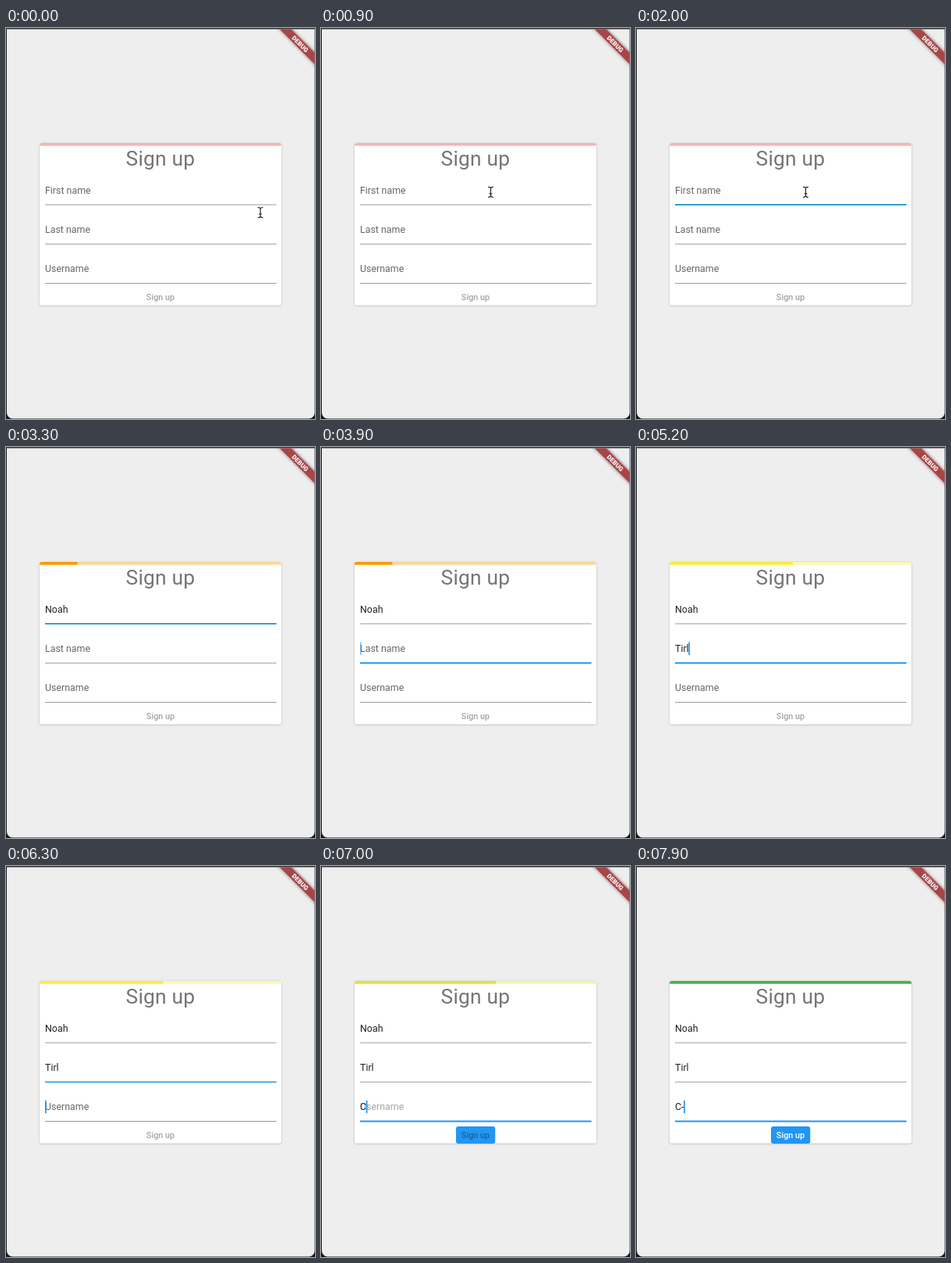
Recreate the animation shown at these times as an HTML page. Size 396 by 500 pixels, loop 8 s.

```html
<!DOCTYPE html>
<html lang="en">
<head>
<meta charset="utf-8">
<title>Sign up form</title>
<style>
  html, body { margin: 0; width: 100%; height: 100%; overflow: hidden; background: #15191b; }
  svg { display: block; width: 396px; height: 500px; font-family: Roboto, sans-serif; }
  .hint { fill: rgba(0, 0, 0, .6); }
  .typed { fill: #212121; }
  .field { font-size: 12.4px; }
</style>
</head>
<body>
<svg viewBox="0 0 396 500">
  <defs>
    <clipPath id="window"><path d="M1 1.5H395.6V492a7.5 7.5 0 0 1-7.5 7.5H8.500a7.500 7.500 0 0 1-7.500-7.500Z"/></clipPath>
    <clipPath id="cardClip"><rect x="43" y="147" width="310" height="207.500" rx="3"/></clipPath>
    <filter id="cardShadow" x="-5%" y="-5%" width="110%" height="110%">
      <feDropShadow dx="0" dy=".6" stdDeviation=".8" flood-opacity=".28"/>
    </filter>
    <filter id="bannerShadow" x="-20%" y="-100%" width="140%" height="300%">
      <feDropShadow dx="0" dy="0" stdDeviation="2" flood-opacity=".5"/>
    </filter>
  </defs>
  <rect width="396" height="2" fill="#303234"/>
  <g clip-path="url(#window)">
    <rect width="396" height="500" fill="#eee"/>
    <rect x="43" y="147" width="310" height="207.500" rx="3" fill="#fff" filter="url(#cardShadow)"/>
    <g clip-path="url(#cardClip)">
      <rect x="43" y="147" width="310" height="3.600" fill="#fff"/>
      <rect id="track" x="43" y="147" width="310" height="3.600" opacity=".4"/>
      <rect id="bar" x="43" y="147" width="0" height="3.600"/>
    </g>
    <text x="198" y="175.500" text-anchor="middle" font-size="26.400" letter-spacing=".2" fill="#757575">Sign up</text>
    <g id="fields"></g>
    <rect id="button" x="173" y="333" width="50.300" height="22" rx="3" fill="#2196f3"/>
    <text id="label" x="198" y="348" text-anchor="middle" font-size="10.850" font-weight="500">Sign up</text>
    <g transform="translate(396 1.500) rotate(45)">
      <rect x="-45" y="21.500" width="90" height="10.500" fill="#a84447" filter="url(#bannerShadow)"/>
      <text y="29.700" text-anchor="middle" font-size="8.100" font-weight="900" fill="#fff">DEBUG</text>
    </g>
    <g id="pointer" fill="none" stroke-linecap="round">
      <path d="M-3-6.500Q0-6.500 0-4.500Q0-6.500 3-6.500M0-4.500V4.500M-3 6.500Q0 6.500 0 4.500Q0 6.500 3 6.500M-1.500 2H1.500" stroke="#fff" stroke-width="2.600"/>
      <path d="M-3-6.500Q0-6.500 0-4.500Q0-6.500 3-6.500M0-4.500V4.500M-3 6.500Q0 6.500 0 4.500Q0 6.500 3 6.500M-1.500 2H1.500" stroke="#222" stroke-width="1.200"/>
    </g>
  </g>
</svg>
<script>
const LOOP = 8000;
const $ = id => document.getElementById(id);
const clamp = x => Math.min(1, Math.max(0, x));
const phase = (t, start, length) => clamp((t - start) / length);
const lerp = (a, b, k) => a + (b - a) * k;
const smooth = k => k * k * (3 - 2 * k);
const mix = (a, b, k) => a.map((v, i) => lerp(v, b[i], k));
const rgb = c => `rgb(${c.map(Math.round)})`;

// Piecewise linear value from [time, value] steps.
function track(steps, t) {
  const next = steps.findIndex(s => s[0] > t);
  if (next === 0) return steps[0][1];
  if (next < 0) return steps[steps.length - 1][1];
  const [t0, a] = steps[next - 1], [t1, b] = steps[next];
  return lerp(a, b, (t - t0) / (t1 - t0));
}

// cubic-bezier(.42, 0, 1, 1)
function easeIn(x) {
  let lo = 0, hi = 1;
  for (let i = 0; i < 24; i++) {
    const s = (lo + hi) / 2, r = 1 - s;
    if (1.26 * s * r * r + 3 * s * s * r + s ** 3 < x) lo = s; else hi = s;
  }
  return smooth(lo);
}

const RAMP = [[244, 67, 54], [255, 152, 0], [255, 235, 59], [76, 175, 80]];
const GREY = [140, 140, 140];
const ACCENT = [33, 150, 243];

const fields = [
  { hint: 'First name', value: 'Noah', keys: [2070, 2190, 2290, 2400], focus: 960, blur: 3590, accent: [48, 162, 206],
    caret: [[960, 0], [1000, 1], [1690, 1], [1900, 0], [2060, 0], [2070, 1], [2960, 1], [3280, 0]] },
  { hint: 'Last name', value: 'Tirl', keys: [4545, 4760, 4960, 5150], focus: 3590, blur: 6290, accent: ACCENT,
    caret: [[3590, 0], [3600, 1], [3820, 1], [4000, 0], [4360, 0], [4540, 1], [5860, 1], [6100, 0]] },
  { hint: 'Username', value: 'C-', keys: [6935, 7590], focus: 6290, blur: LOOP, accent: ACCENT,
    caret: [[6290, 0], [6300, 1]] }
];

function add(name, attributes, text = '') {
  const node = document.createElementNS('http://www.w3.org/2000/svg', name);
  for (const key in attributes) node.setAttribute(key, attributes[key]);
  node.textContent = text;
  return $('fields').appendChild(node);
}

fields.forEach((f, i) => {
  const y = 211.6 + i * 50.25;
  f.line = add('line', { x1: 50, x2: 346.6, y1: y + 14.4, y2: y + 14.4 });
  f.hintNode = add('text', { x: 50, y, class: 'field hint' }, f.hint);
  f.typedNode = add('text', { x: 50, y, class: 'field typed' });
  f.caretNode = add('rect', { y: y - 12.4, width: 1.7, height: 16.5, fill: '#2196f3' });
});

function drawField(f, t) {
  const focus = phase(t, f.focus, 180) * (1 - phase(t, f.blur, 180));
  f.line.setAttribute('stroke', rgb(mix(GREY, f.accent, focus)));
  f.line.setAttribute('stroke-width', lerp(0.85, 1.8, focus));
  f.hintNode.setAttribute('opacity', 1 - smooth(phase(t, f.keys[0], 150)));

  const text = f.value.slice(0, f.keys.filter(k => k <= t).length);
  if (f.typedNode.textContent !== text) f.typedNode.textContent = text;
  f.caretNode.setAttribute('x', 50 + (text ? f.typedNode.getComputedTextLength() - 0.3 : 0));
  f.caretNode.setAttribute('opacity', t < f.blur ? track(f.caret, t) : 0);
}

function drawProgress(t) {
  const p = fields.reduce((sum, f) => sum + phase(t, f.keys[0], 400), 0);
  const i = Math.min(2, Math.floor(p));
  const colour = rgb(mix(RAMP[i], RAMP[i + 1], p - i));
  $('track').setAttribute('fill', colour);
  $('bar').setAttribute('fill', colour);
  $('bar').setAttribute('width', 310 * easeIn(p / 3));
}

function drawButton(t) {
  const start = fields[2].keys[0];
  const k = phase(t, start + 40, 220);
  const white = 255 * k;
  $('button').setAttribute('opacity', phase(t, start, 60));
  $('label').setAttribute('fill', `rgba(${white},${white},${white},${lerp(0.36, 1, k)})`);
}

function drawPointer(t) {
  const k = smooth(phase(t, 60, 840));
  $('pointer').setAttribute('transform', `translate(${lerp(326, 217.5, k)} ${lerp(236, 209.8, k)})`);
  $('pointer').setAttribute('opacity', t < fields[0].keys[0] ? 1 : 0);
}

function render(t) {
  fields.forEach(f => drawField(f, t));
  drawProgress(t);
  drawButton(t);
  drawPointer(t);
}

const begin = performance.now();
function tick() {
  render((performance.now() - begin) % LOOP);
  requestAnimationFrame(tick);
}
tick();
</script>
</body>
</html>
```
